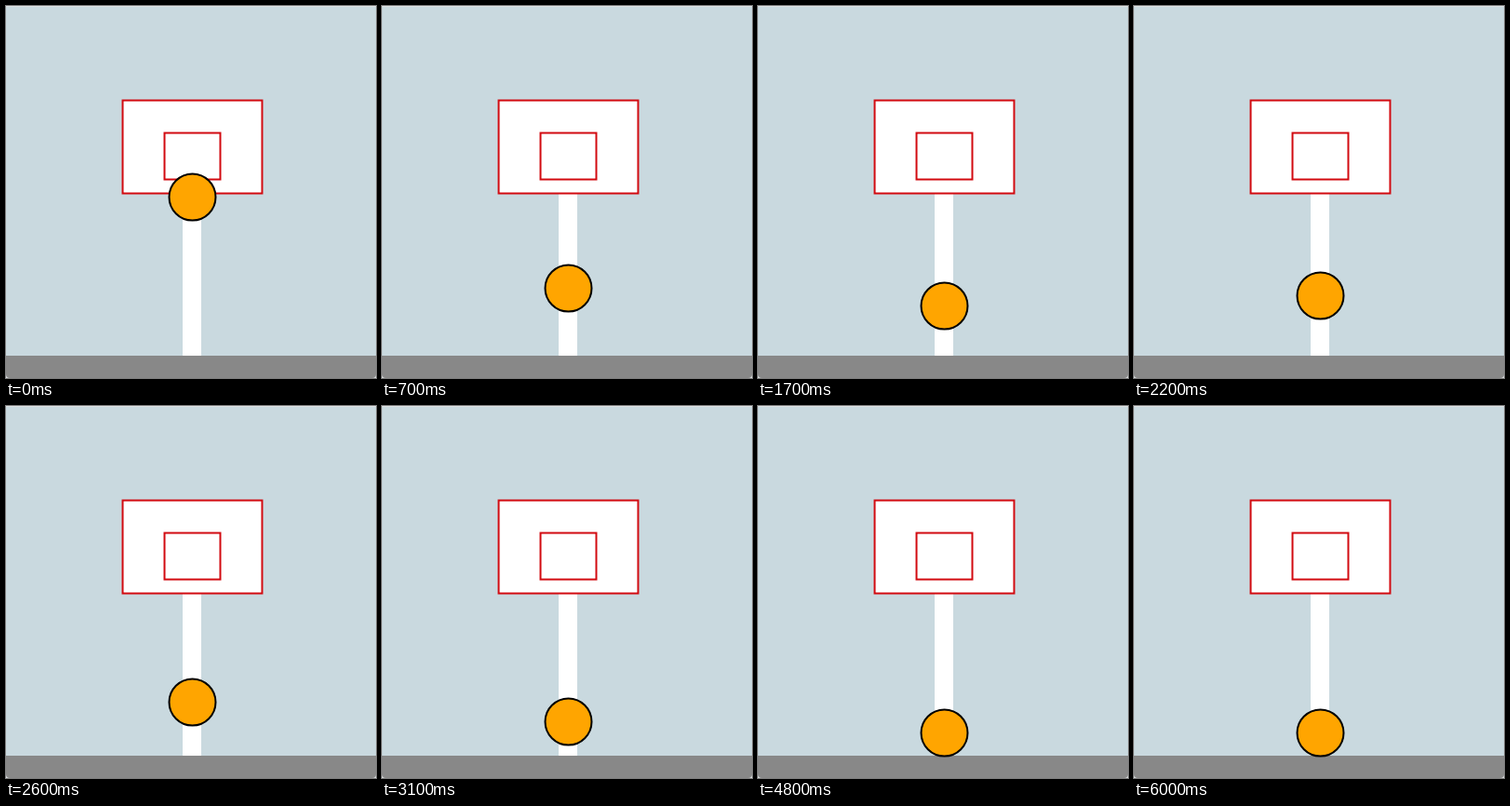
Animation of 398x400 px, one loop 6400 ms. Source, as an HTML page with a canvas:

```html
<!DOCTYPE html>
<html lang="en">
<head>
<meta charset="utf-8">
<title>Bouncing ball</title>
<style>
  html, body { margin: 0; width: 100%; height: 100%; overflow: hidden; background: #dfe3e4; }
  canvas { display: block; border-radius: 0 0 4px 4px; }
</style>
</head>
<body>
<canvas id="stage" width="398" height="400"></canvas>
<script>
const ctx = document.getElementById('stage').getContext('2d');
const LOOP = 6400, HOLD = 100;
const START = 200, FLOOR = 350, GRAVITY = 0.2, BOUNCE = 0.8;

// Height of the ball after a number of physics steps.
function ballY(steps) {
  let y = START, speed = 0;
  for (let i = 0; i < steps; i++) {
    speed += GRAVITY;
    y += speed;
    if (y > FLOOR) {
      y = FLOOR;
      speed *= -BOUNCE;
    }
  }
  return y;
}

function fillRect(color, x, y, w, h) {
  ctx.fillStyle = color;
  ctx.fillRect(x, y, w, h);
}

function board(x, y, w, h) {
  fillRect('#fff', x, y, w, h);
  ctx.strokeStyle = '#d20a10';
  ctx.strokeRect(x, y, w, h);
}

function draw(time) {
  const t = Math.floor(time % LOOP / HOLD) * HOLD;
  const steps = Math.floor(6.45 + t * 0.0603);

  fillRect('#c9d9df', 0, 0, 398, 400);
  fillRect('#dfe3e4', 0, 0, 398, 1);
  fillRect('#fff', 190, 201, 20, 175);
  fillRect('#888', 0, 376, 398, 24);
  ctx.lineWidth = 2;
  board(125.5, 101.5, 150, 100);
  board(170.5, 136.5, 60, 50);

  ctx.beginPath();
  ctx.arc(200.5, Math.floor(ballY(steps)) + 1.5, 25, 0, Math.PI * 2);
  ctx.fillStyle = '#ffa500';
  ctx.fill();
  ctx.strokeStyle = '#000';
  ctx.stroke();
}

const begin = performance.now();
function tick() {
  draw(performance.now() - begin);
  requestAnimationFrame(tick);
}
tick();
</script>
</body>
</html>
```
